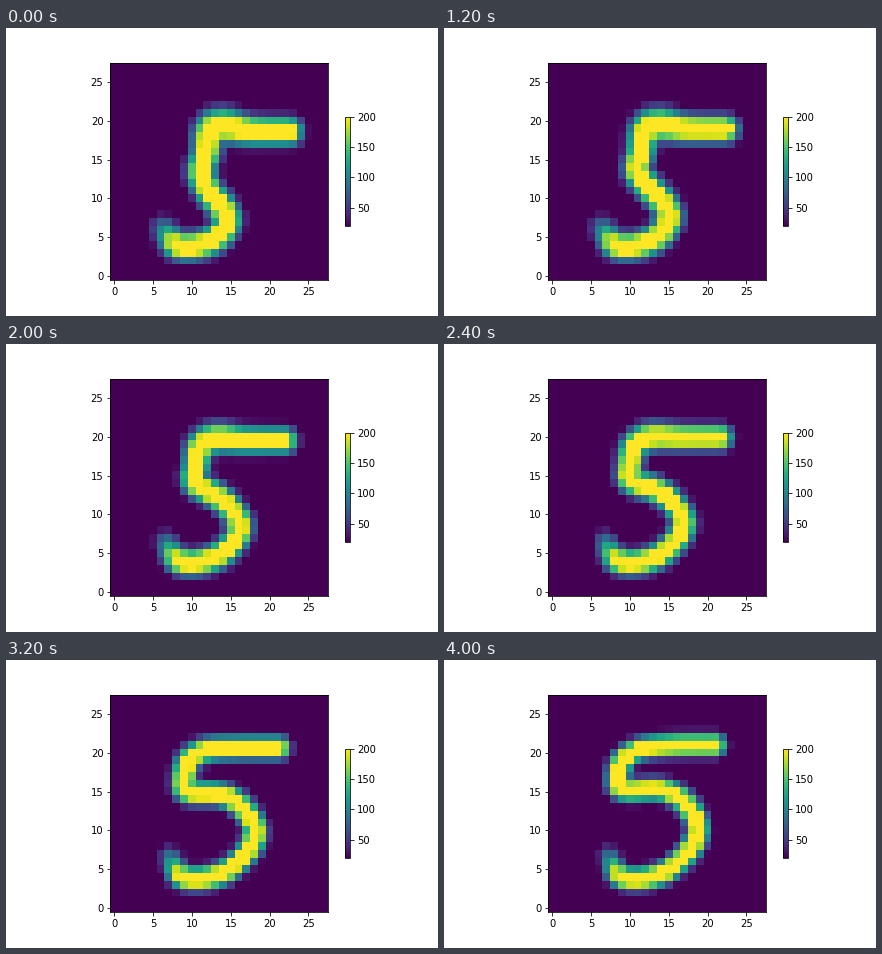
Animation, 432 px wide and 288 px high, one loop 4200 ms. Source, as a matplotlib script:

```python
import numpy as np
import matplotlib.pyplot as plt
from matplotlib.animation import FuncAnimation

FRAMES, INTERVAL, SIZE = 21, 200, 28

# Key points of the pen path, from the top right end to the faint hook.
START = np.array([(22.4, 18.6), (17.5, 18.7), (14, 19.3), (12.3, 18.4),
                  (11.8, 15.7), (11.2, 13.3), (12.2, 10.9), (13.6, 9.2),
                  (14.6, 7.2), (13.3, 5.1), (11, 4), (8.2, 4), (6.2, 6.3)])
END = np.array([(20.9, 20.95), (15.5, 20.9), (11.7, 20.5), (9.3, 19.2),
                (8.5, 16.7), (9.3, 15.2), (14, 15.2), (17, 13.6),
                (18.8, 10.3), (17.2, 6.9), (13.5, 4.2), (9, 4), (7.3, 6.8)])
HOOK = len(START) - 2
CORNER = 2.3

U = np.linspace(0, len(START) - 1, 261)
ROWS, COLS = np.mgrid[:SIZE, :SIZE, :1][:2]


def mix(a, b, amount):
    return a + (b - a) * amount


def spline(points, u):
    """Smooth curve through points at index positions u."""
    slope = np.gradient(points, axis=0)
    i = np.minimum(u.astype(int), len(points) - 2)
    s = (u - i)[:, None]
    blend = s * s * (3 - 2 * s)
    return (mix(points[i], points[i + 1], blend)
            + s * (1 - s) ** 2 * slope[i] - s * s * (1 - s) * slope[i + 1])


def digit(frame):
    t = (frame / (FRAMES - 1)) ** 1.25
    ease = t * t * (3 - 2 * t)
    x, y = spline(mix(START, END, ease), U).T
    # The stroke is thick at the upper left corner and thins out over time.
    bump = np.exp(-(U - CORNER) ** 2)
    width = mix(1.75 + 0.45 * bump, 1.42, ease)
    ink = mix(250, 85, np.clip(U - HOOK, 0, 1))
    dist2 = (COLS - x) ** 2 + (ROWS - y) ** 2
    return (ink * np.exp(-dist2 / width ** 2)).max(axis=-1)


fig, ax = plt.subplots(figsize=(6, 4), dpi=72)
fig.subplots_adjust(bottom=0.125)
image = ax.imshow(digit(0), origin="lower", cmap="viridis", vmin=20, vmax=200,
                  interpolation="nearest")
fig.colorbar(image, ax=ax, shrink=0.5)


def update(frame):
    image.set_data(digit(frame))
    return (image,)


anim = FuncAnimation(fig, update, frames=FRAMES, interval=INTERVAL,
                     repeat=True, repeat_delay=0)
plt.show()
```
